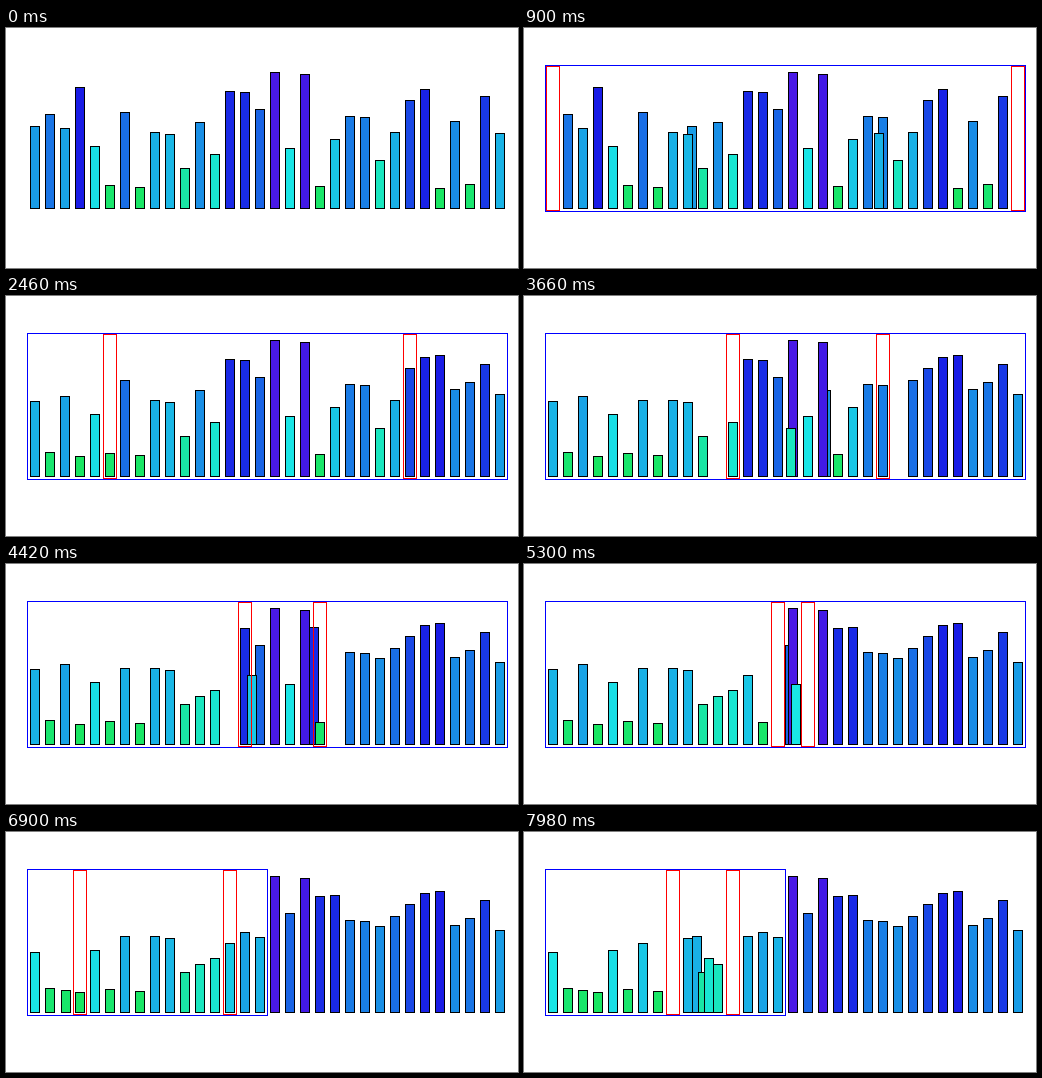
Animation, 512 px wide and 240 px high, one loop 8000 ms. Source, as an HTML page:

```html
<!DOCTYPE html>
<html lang="en">
<head>
<meta charset="utf-8">
<title>Quicksort</title>
<style>
html, body { margin: 0; width: 100%; height: 100%; overflow: hidden; background: #fff; }
svg { display: block; width: 100vw; height: 100vh; }
rect { fill: none; stroke: #000; stroke-width: 1; }
</style>
</head>
<body>
<svg id="stage" viewBox="0 0 512 240" shape-rendering="crispEdges"></svg>
<script>
const LOOP = 8000, LEAD = 500, TICK = 40;
const BASE = 180, PITCH = 15, LEFT = 24;

// Durations in ticks
const HOLD = 2, SCAN = 2.25, SWAP = 9.85, MOVE = 10.03;

// The values to sort, as the y of each bar's top
const tops = [98, 86, 100, 59, 118, 157, 84, 159, 104, 106, 140, 94, 126, 63, 64, 81,
  44, 120, 46, 158, 111, 88, 89, 132, 104, 72, 61, 160, 93, 156, 68, 105];

// Runs a Hoare quicksort once and logs when markers move and bars swap
function record(values) {
  const a = values.slice();
  const marks = [], swaps = [];
  let clock = HOLD;

  function sort(lo, hi) {
    if (lo >= hi) return;
    const pivot = a[lo];
    let i = lo, j = hi;
    const mark = at => marks.push({ at, lo, hi, i, j });
    mark(Math.ceil(clock));
    clock += 2 * SCAN;
    while (i <= j) {
      const shorter = a[i] > pivot, taller = a[j] < pivot;
      if (shorter || taller) {
        if (shorter) i++;
        if (taller) j--;
        mark(Math.ceil(clock));
        clock += SCAN;
      } else {
        const at = Math.ceil(clock);
        swaps.push({ at, i, j });
        [a[i], a[j]] = [a[j], a[i]];
        i++;
        j--;
        mark(at + 6);
        clock += SWAP + SCAN;
      }
    }
    sort(lo, j);
    sort(i, hi);
  }

  sort(0, a.length - 1);
  return { marks, swaps };
}

const { marks, swaps } = record(tops);
const stage = document.getElementById('stage');

function addRect(stroke) {
  const el = document.createElementNS('http://www.w3.org/2000/svg', 'rect');
  el.style.stroke = stroke;
  return stage.appendChild(el);
}

function place(el, x, y, w, h) {
  el.setAttribute('x', x + 0.5);
  el.setAttribute('y', y + 0.5);
  el.setAttribute('width', w);
  el.setAttribute('height', h);
}

const range = addRect('#00f');
const bars = tops.map(() => addRect('#000'));
const markers = [addRect('#f00'), addRect('#f00')];
const slotX = n => LEFT + PITCH * n;
const hue = top => 122 + 0.97 * (BASE - top);

function drawBars(tick) {
  const order = tops.slice();
  const xs = order.map((_, n) => slotX(n));
  for (const { at, i, j } of swaps) {
    if (tick < at) break;
    const p = (tick - at) / MOVE;
    if (p < 1) {
      const shift = (slotX(j) - slotX(i)) * p;
      xs[i] += shift;
      xs[j] -= shift;
    } else {
      [order[i], order[j]] = [order[j], order[i]];
    }
  }
  order.forEach((top, n) => {
    place(bars[n], Math.round(xs[n] + 0.3), top, 9, BASE - top);
    bars[n].style.fill = `hsl(${hue(top)}, 80%, 50%)`;
  });
}

function drawMarkers(tick) {
  for (const el of [range, ...markers]) el.style.display = tick < 0 ? 'none' : '';
  const { lo, hi, i, j } = marks.filter(m => m.at <= tick).pop() || marks[0];
  place(range, slotX(lo) - 3, 37, (hi - lo + 1) * PITCH, 146);
  [i, j].forEach((n, k) => place(markers[k], slotX(n) - 2, 38, 13, 144));
}

function draw(ms) {
  const tick = Math.floor((ms - LEAD) / TICK);
  drawBars(tick);
  drawMarkers(tick);
}

const origin = performance.now();
function loop() {
  draw((performance.now() - origin) % LOOP);
  requestAnimationFrame(loop);
}
loop();
</script>
</body>
</html>
```
